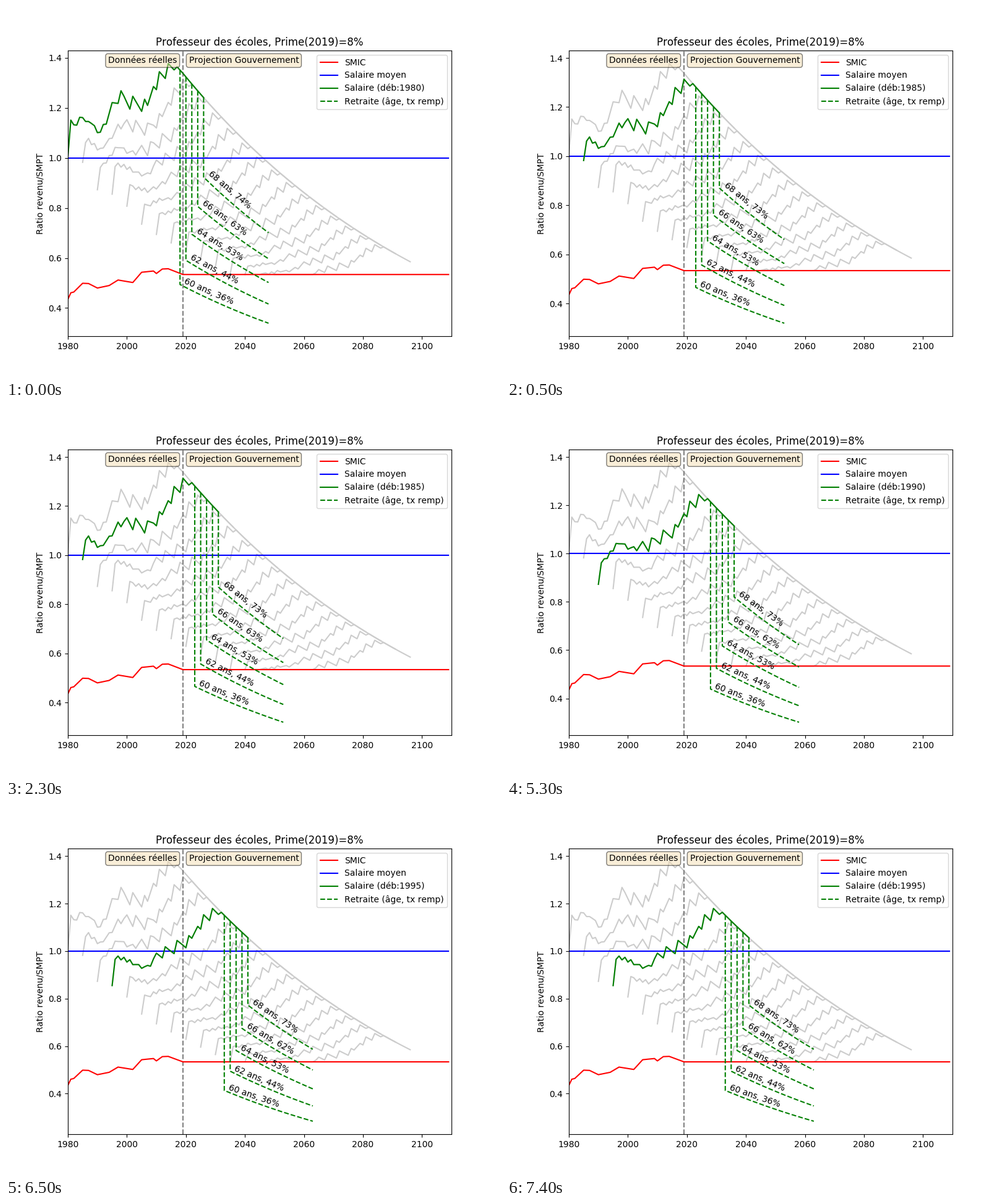
Animation of 800x600 px, one loop 8 s. Source, as a matplotlib script:

```python
import matplotlib.pyplot as plt
import numpy as np
from matplotlib.animation import FuncAnimation

plt.rcParams["font.family"] = "DejaVu Sans"
plt.rcParams["text.kerning_factor"] = 6   # older, looser letter spacing

YEARS = np.arange(1980, 2110)
TURN = 2019                # projections start here
AGES = np.arange(60, 70, 2)
AGE_START, AGE_END = 22, 90
CAREER = 68 - AGE_START


def through(*points):
    """Yearly series through (year, value) points, flat after the last one."""
    return np.interp(YEARS, *zip(*points))


# Minimum wage, and top of the salary scale, relative to the mean wage
SMIC = through((1980, .435), (1981, .461), (1982, .464), (1985, .499),
               (1987, .498), (1990, .480), (1994, .490), (1997, .512),
               (2002, .502), (2005, .543), (2009, .548), (2010, .538),
               (2012, .556), (2014, .557), (TURN, .534))
TOP = through((1980, 2.116), (1981, 2.143), (1982, 2.075), (1985, 2.068),
              (1986, 1.976), (1987, 1.976), (1991, 1.791), (1995, 1.800),
              (1997, 1.795), (1999, 1.735), (2002, 1.627), (2005, 1.548),
              (2007, 1.487), (2009, 1.476), (2014, 1.403), (TURN, 1.338))
TOP *= 1.0108 ** -np.maximum(YEARS - TURN, 0.0)

# Salary steps: index points, years spent on the step
STEPS = [(390, 1), (441, 1), (448, 2), (461, 2), (476, 2.5),
         (492, 3), (519, 3), (557, 3.5), (590, 4), (629, 4),
         (668, 2.5), (715, 2.5), (763, 3), (806, 3), (821, 10)]
POINTS, SPANS = np.array(STEPS).T
HALF_YEARS = np.repeat(POINTS, (2 * SPANS).astype(int))
SCALE = HALF_YEARS.reshape(-1, 2).mean(axis=1) / POINTS[-1]


def career(start):
    """Years and salary ratios, never below the minimum wage."""
    first = start - YEARS[0]
    span = slice(first, first + CAREER + 1)
    return YEARS[span], np.maximum(SCALE * TOP[span], SMIC[span])


CAREERS = [career(start) for start in range(1980, 2051, 5)]
PEAK = max(pay.max() for _, pay in CAREERS)


def final_pensions(k):
    """Pension ratio at 90 for each leaving age, k-th cohort."""
    n = np.arange(len(AGES))
    return (.3394 + .0722 * n + .00455 * n ** 2) * .9425 ** k


def replacement_rates(k):
    n = np.arange(len(AGES))
    return 36.45 + 7.39 * n + .47 * n ** 2 - .2 * k


fig, ax = plt.subplots(figsize=(8, 6), dpi=100)


def draw_pension(start, pay, age, final, rate):
    leave, end = start + age - AGE_START, start + AGE_END - AGE_START
    years = np.arange(leave, end + 1)
    pension = final * 1.0126 ** (end - years)
    line, = ax.plot(np.append(leave, years),
                    np.append(pay[leave - start], pension), "g--")
    # The label is tilted like the on-screen chord of the curve
    ends = ax.transData.transform([(leave, pension[0]), (end, final)])
    dx, dy = ends[1] - ends[0]
    ax.text(leave + 1, pension[0] + .03, f"{age} ans, {rate:.0f}%",
            va="top", rotation=np.degrees(np.arctan2(dy, dx)))
    return line


def draw_note(year, text, ha):
    ax.text(year, .98, text, ha=ha, va="top",
            transform=ax.get_xaxis_transform(),
            bbox=dict(boxstyle="round", facecolor="wheat", alpha=.5))


def draw(frame):
    k = (frame + 5) // 6   # first cohort is held for a single frame
    years, pay = CAREERS[k]
    finals = final_pensions(k)

    ax.clear()
    margin = .05 * (PEAK - finals[0])
    ax.set_xlim(1980, 2110)
    ax.set_ylim(finals[0] - margin, PEAK + margin)

    for xs, ys in CAREERS:
        ax.plot(xs, ys, color="0.8")
    ax.axvline(TURN, color="grey", linestyle="--")
    ax.plot(YEARS, SMIC, "r", label="SMIC")
    ax.plot(YEARS, np.ones(len(YEARS)), "b", label="Salaire moyen")
    ax.plot(years, pay, "g", label=f"Salaire (déb:{years[0]})")
    for age, final, rate in zip(AGES, finals, replacement_rates(k)):
        line = draw_pension(years[0], pay, age, final, rate)
    line.set_label("Retraite (âge, tx remp)")

    draw_note(2017, "Données réelles", "right")
    draw_note(2021, "Projection Gouvernement", "left")
    ax.set_title("Professeur des écoles, Prime(2019)=8%")
    ax.set_ylabel("Ratio revenu/SMPT")
    ax.legend(loc="upper right")
    return []


anim = FuncAnimation(fig, draw, frames=16, interval=500,
                     init_func=lambda: [], repeat=True, repeat_delay=0)
plt.show()
```
